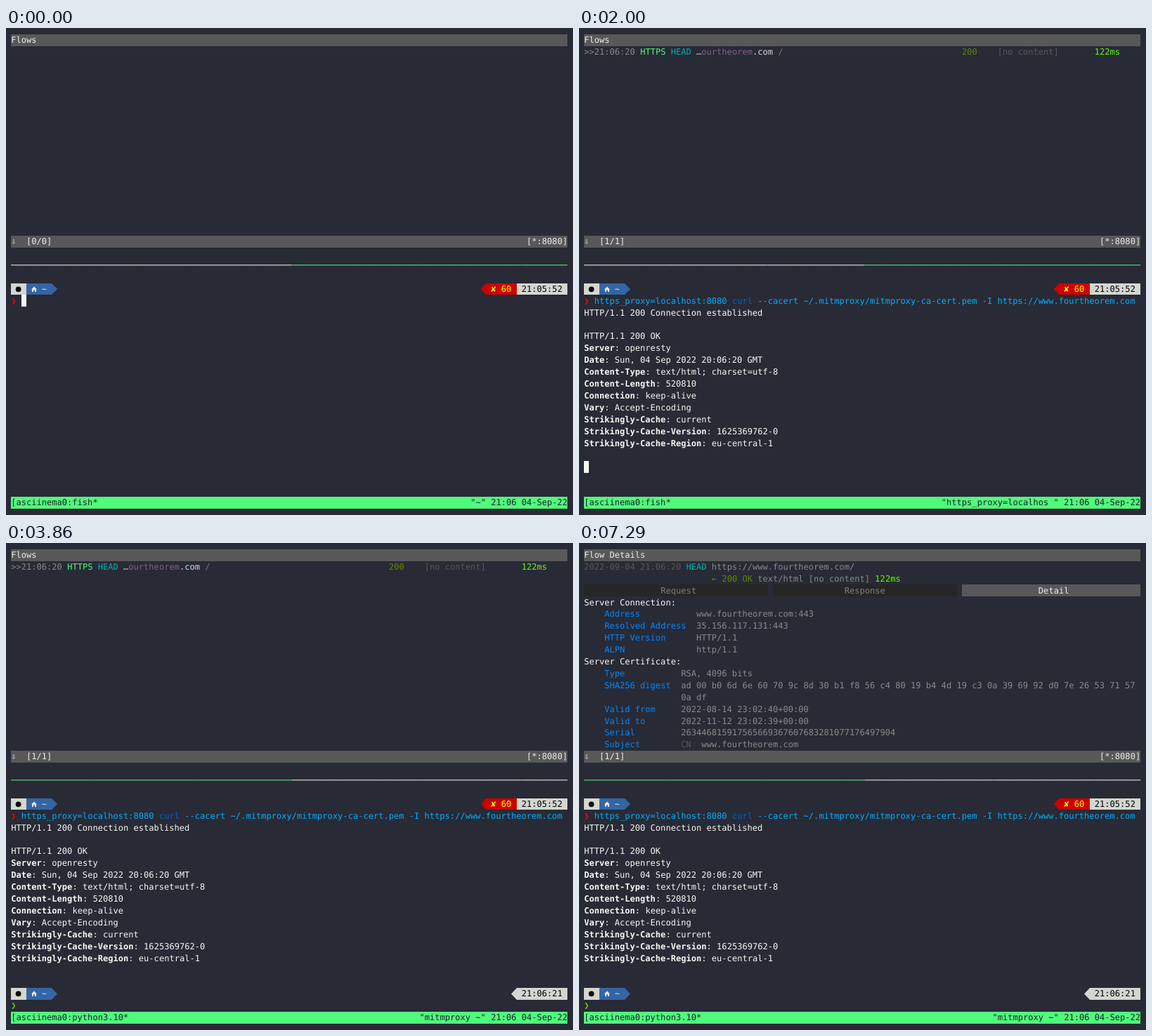
An HTML page that plays this animation: 807x694 px, repeating every 8 s.

```html
<!DOCTYPE html>
<html lang="en">
<head>
<meta charset="utf-8">
<title>Terminal proxy session</title>
<style>
html, body { margin: 0; width: 100%; height: 100%; overflow: hidden; background: #282a36; }
svg { display: block; }
text {
  font: 12.07px "DejaVu Sans Mono", "Noto Sans Mono", monospace;
  white-space: pre;
  text-rendering: geometricPrecision;
}
.bold { font-weight: bold; }
</style>
</head>
<body>
<svg id="stage" width="807" height="694" viewBox="0 0 807 694"></svg>
<script>
const LOOP = 8000, COLS = 109, CELL = 7.266, ROW = 16.9, LEFT = 7.2, TOP = 8.7;
const FG = '#f8f8f2', BAR = '#585858', LIGHT = '#eeeeee', GREY = '#8a8a8a', KEY = '#0087ff',
  DARK = '#262626', GREEN = '#50fa7b', PALE = '#d3d7cf', BLUE = '#3465a4', RED = '#cc0000',
  CYAN = '#00afaf', OLIVE = '#5f8700', LIME = '#5fff00', PARAM = '#00afff';

const stage = document.getElementById('stage');
const scenes = [];
let group;

const px = col => Math.round(LEFT + col * CELL);
const py = row => Math.round(TOP + row * ROW);

function add(tag, attrs, parent = group) {
  const el = document.createElementNS('http://www.w3.org/2000/svg', tag);
  for (const name in attrs) el.setAttribute(name, attrs[name]);
  return parent.appendChild(el);
}

// Everything drawn by `draw` is visible from `from` until `to`.
function scene(from, to, draw) {
  group = add('g', {}, stage);
  scenes.push({ el: group, from, to });
  draw();
}

function write(row, col, str, fill = FG, cls = '') {
  const x = LEFT + col * CELL, y = TOP + row * ROW + 12.2;
  add('text', { x, y, fill, class: cls }).textContent = str;
}

const writeRight = (row, str, fill) => write(row, COLS - str.length, str, fill);

function fillCells(row, from, to, fill) {
  add('rect', { x: px(from), y: py(row), width: px(to) - px(from), height: py(row + 1) - py(row), fill });
}

// Triangle one cell wide; its base is at column `base`, its tip at `tip`.
function arrow(row, base, tip, fill) {
  const top = py(row), bottom = py(row + 1);
  add('path', { d: `M${px(base)} ${top}L${px(tip)} ${(top + bottom) / 2}L${px(base)} ${bottom}Z`, fill });
}

function bar(row, left, right = '') {
  fillCells(row, 0, COLS, BAR);
  write(row, 0, left, LIGHT);
  writeRight(row, right, LIGHT);
}

const cursor = (row, col) => fillCells(row, col, col + 1, FG);

function prompt(row, time, failed, markColor) {
  const y = py(row);
  fillCells(row, 0, 3, PALE);
  add('circle', { cx: 17.6, cy: y + 8.3, r: 3.9, fill: '#080808' });
  fillCells(row, 3, 8, BLUE);
  arrow(row, 8, 9, BLUE);
  add('path', { d: `M36 ${y + 8.6}l4-4 4 4h-1v3.4h-2v-2.4h-2v2.4h-2v-3.4z`, fill: '#e4e4e4' });
  write(row, 6, '~', '#e4e4e4');
  if (failed) {
    arrow(row, 93, 92, RED);
    fillCells(row, 93, 99, RED);
    write(row, 94, '✘', '#ffff00');
    write(row, 96, '60', '#ffff00');
  } else {
    arrow(row, 99, 98, PALE);
  }
  fillCells(row, 99, COLS, PALE);
  write(row, 100, time, '#000000');
  write(row + 1, 0, '❯', markColor);
}

function divider(left, right) {
  write(19, 0, '─'.repeat(55), left);
  write(19, 55, '─'.repeat(54), right);
}

function status(job, title) {
  fillCells(39, 0, COLS, GREEN);
  write(39, 0, `[asciinema0:${job}*`, '#21222c');
  writeRight(39, `"${title}" 21:06 04-Sep-22`, '#21222c');
}

function counter(str) {
  bar(17, '⇩', '[*:8080]');
  write(17, 3, str, LIGHT);
}

const host = 'www.fourtheorem.com';
const headers = [
  ['Server', 'openresty'],
  ['Date', 'Sun, 04 Sep 2022 20:06:20 GMT'],
  ['Content-Type', 'text/html; charset=utf-8'],
  ['Content-Length', '520810'],
  ['Connection', 'keep-alive'],
  ['Vary', 'Accept-Encoding'],
  ['Strikingly-Cache', 'current'],
  ['Strikingly-Cache-Version', '1625369762-0'],
  ['Strikingly-Cache-Region', 'eu-central-1']
];

function pairs(row, list, keyCol, valueCol) {
  list.forEach(([key, value], i) => {
    write(row + i, keyCol, key, KEY);
    write(row + i, valueCol, value, GREY);
  });
}

const withColon = list => list.map(([key, value]) => [key + ':', value]);

function tabs(active) {
  [['Request', 0, 36, 15], ['Response', 37, 73, 51], ['Detail', 74, COLS, 89]].forEach(([name, from, to, col]) => {
    const on = name === active;
    fillCells(3, from, to, on ? BAR : DARK);
    write(3, col, name, on ? LIGHT : '#808080');
  });
}

function bodyBar(row, label) {
  bar(row, label, '[ :auto]');
  write(row, 102, 'm', KEY);
}

// Bottom pane
scene(0, LOOP, () => prompt(21, '21:05:52', true, '#ff0000'));
scene(0, 500, () => cursor(22, 2));
scene(500, LOOP, () => {
  write(22, 2, 'https_proxy=localhost:8080', PARAM);
  write(22, 29, 'curl', '#005fd7');
  write(22, 34, '--cacert ~/.mitmproxy/mitmproxy-ca-cert.pem -I https://' + host, PARAM);
});
scene(500, 1670, () => cursor(22, 108));
scene(1670, 1760, () => cursor(23, 0));
scene(1760, LOOP, () => write(23, 0, 'HTTP/1.1 200 Connection established'));
scene(1760, 2000, () => cursor(25, 0));
scene(2000, LOOP, () => {
  write(25, 0, 'HTTP/1.1 200 OK');
  headers.forEach(([key, value], i) => {
    write(26 + i, 0, key, FG, 'bold');
    write(26 + i, key.length, ': ' + value);
  });
});
scene(2000, 2030, () => cursor(36, 0));
scene(2030, LOOP, () => prompt(37, '21:06:21', false, '#5fd700'));
scene(2030, 3860, () => cursor(38, 2));

// Pane border and status line
scene(0, 3860, () => divider(FG, GREEN));
scene(3860, LOOP, () => divider(GREEN, FG));
scene(0, 1670, () => status('fish', '~'));
scene(1670, 2030, () => status('fish', 'https_proxy=localhos '));
scene(2030, 3860, () => status('fish', '~'));
scene(3860, LOOP, () => status('python3.10', 'mitmproxy ~'));

// Top pane: flow list
scene(0, 2000, () => counter('[0/0]'));
scene(2000, LOOP, () => counter('[1/1]'));
scene(0, 5280, () => bar(0, 'Flows'));
scene(2000, 5280, () => {
  write(1, 0, '>>21:06:20', GREY);
  write(1, 11, 'HTTPS', GREEN);
  write(1, 17, 'HEAD', CYAN);
  write(1, 22, '…', '#bcbcbc');
  write(1, 23, 'ourtheorem', '#875f87');
  write(1, 33, '.com', '#dadada');
  write(1, 38, '/', '#767676');
  write(1, 74, '200', OLIVE);
  write(1, 81, '[no content]', BAR);
  write(1, 100, '122ms', LIME);
});

// Top pane: flow details
scene(5280, LOOP, () => {
  bar(0, 'Flow Details');
  write(1, 0, '2022-09-04 21:06:20', BAR);
  write(1, 20, 'HEAD', CYAN);
  write(1, 25, `https://${host}/`, GREY);
  write(2, 25, '← 200 OK', OLIVE);
  write(2, 34, 'text/html [no content]', GREY);
  write(2, 57, '122ms', LIME);
});
scene(5280, 6350, () => {
  tabs('Request');
  pairs(4, withColon([['Host', host], ['User-Agent', 'curl/7.79.1'], ['Accept', '*/*']]), 0, 13);
  bodyBar(7, 'No request content');
});
scene(6350, 7290, () => {
  tabs('Response');
  pairs(4, withColon(headers), 0, 27);
  bodyBar(13, 'No content');
});
scene(7290, LOOP, () => {
  tabs('Detail');
  write(4, 0, 'Server Connection:');
  pairs(5, [
    ['Address', host + ':443'],
    ['Resolved Address', '35.156.117.131:443'],
    ['HTTP Version', 'HTTP/1.1'],
    ['ALPN', 'http/1.1']
  ], 4, 22);
  write(9, 0, 'Server Certificate:');
  pairs(10, [
    ['Type', 'RSA, 4096 bits'],
    ['SHA256 digest', 'ad 00 b0 6d 6e 60 70 9c 8d 30 b1 f8 56 c4 80 19 b4 4d 19 c3 0a 39 69 92 d0 7e 26 53 71 57'],
    ['', '0a df'],
    ['Valid from', '2022-08-14 23:02:40+00:00'],
    ['Valid to', '2022-11-12 23:02:39+00:00'],
    ['Serial', '263446815917565669367607683281077176497904'],
    ['Subject', '    ' + host]
  ], 4, 19);
  write(16, 19, 'CN', BAR);
});

const start = performance.now();
function tick() {
  const t = (performance.now() - start) % LOOP;
  for (const { el, from, to } of scenes) {
    el.style.display = t >= from && t < to ? '' : 'none';
  }
  requestAnimationFrame(tick);
}
tick();
</script>
</body>
</html>
```
